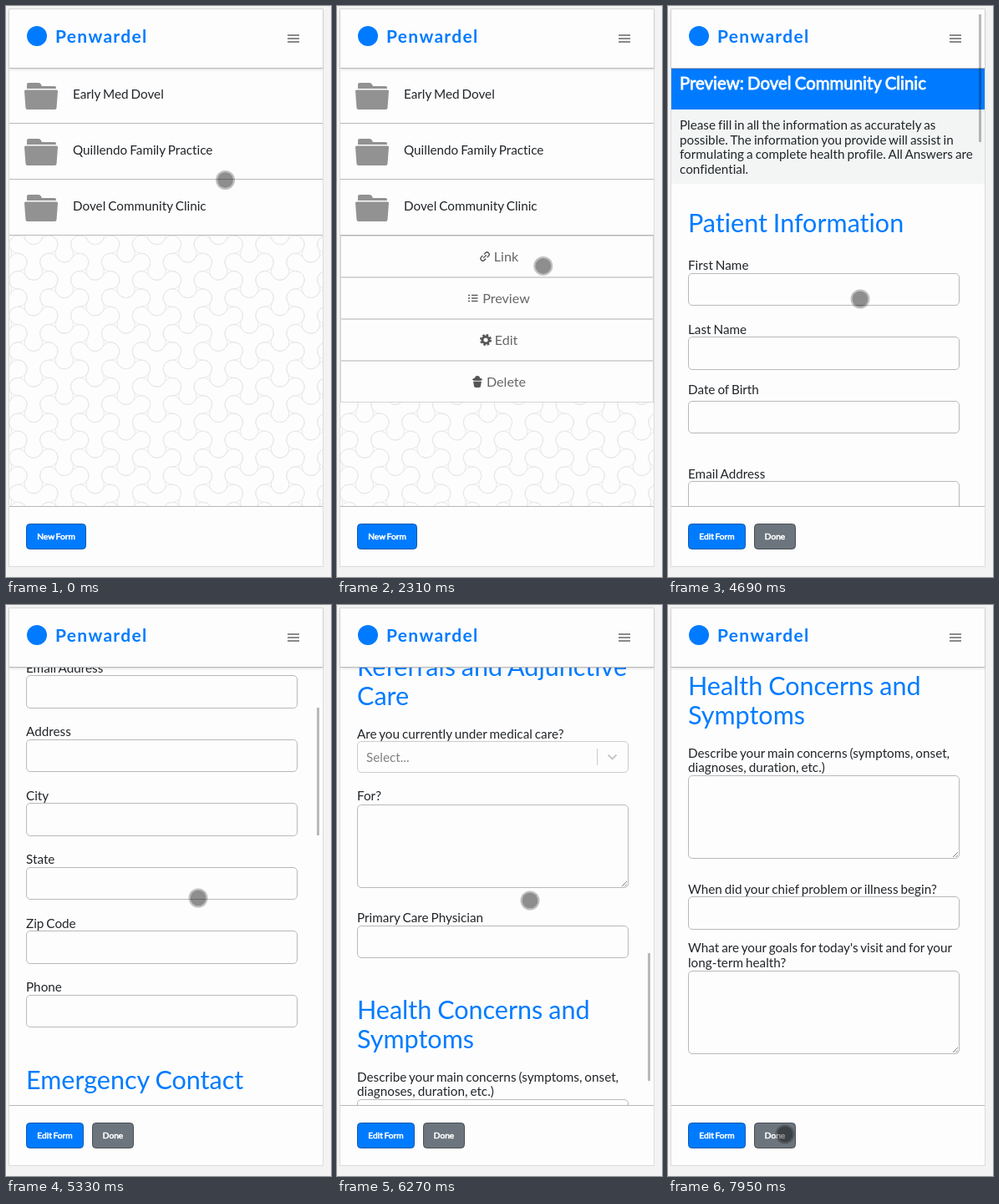
These frames come from a looping animation (389 px wide and 684 px high, 8 s). An HTML page:

```html
<!DOCTYPE html>
<html lang="en">
<head>
<meta charset="utf-8">
<title>Form preview</title>
<style>
html, body { margin: 0; width: 100%; height: 100%; overflow: hidden; background: #f3f3f3; }
body { position: relative; font: 15.27px/17.55px Lato, sans-serif; color: #212529;
  word-spacing: -.06em; font-variant-ligatures: none; }
body *, svg { position: absolute; box-sizing: border-box; white-space: nowrap; }
br { position: static !important; }
#card { left: 3px; top: 3px; width: 377px; height: 669px; background: #fdfdfd; border: 1px solid #dcdcdc; }
#view { left: 4px; top: 75px; width: 375px; height: 524px; overflow: hidden; }
#view > div { left: -4px; top: -75px; width: 389px; height: 2760px; }
#head { left: 4px; top: 4px; width: 375px; height: 71px; background: #fdfdfd; border-bottom: 1px solid #b8b8b8; box-shadow: 0 1px 3px #0002; }
#mark { left: 21px; top: 20px; width: 24px; height: 24px; border-radius: 50%; background: #007bff; }
#brand { left: 55px; top: 19px; font-weight: 700; font-size: 21px; line-height: 26px; letter-spacing: 1.3px; color: #007bff; }
#bars { left: 333px; top: 30px; }
#foot { left: 4px; top: 599px; width: 375px; height: 72px; background: #fdfdfd; border-top: 1px solid #b8b8b8; }
.btn { top: 20px; height: 31px; border: 1px solid #0a58ad; border-radius: 4.5px; background: #007bff; color: #fff;
  font-size: 10.18px; line-height: 29px; text-align: center; -webkit-text-stroke: .6px #fff; }
.gray { background: #6c757d; border-color: #484e54; }
.row { left: 4px; width: 375px; height: 67px; background: #fdfdfd; border-bottom: 1px solid #b8b8b8; }
.row span { left: 76px; top: 23px; }
.row svg { left: 18px; top: 18px; }
#menu { left: 4px; top: 275px; width: 375px; overflow: hidden; }
.item { left: 0; width: 375px; height: 50px; border: 1px solid #d6d6d6; background: #fdfdfd; color: #666;
  font-size: 16.1px; display: flex; align-items: center; justify-content: center; gap: 4px; padding-left: 4px; }
.item > * { position: static; }
#banner { left: 4px; top: 75px; width: 375px; height: 64px; background: #007bff; color: #fff; font-size: 20.4px;
  line-height: 64px; padding-left: 10px; -webkit-text-stroke: .8px #fff; }
#note { left: 4px; top: 139px; width: 375px; height: 89px; background: #f3f5f5; padding: 10px; }
h2 { left: 24px; margin: 0; font-weight: 400; font-size: 30.53px; line-height: 35.1px; color: #007bff; }
.label { left: 24px; }
.box { left: 24px; width: 325px; border: 1px solid #b9b9b9; border-radius: 5px; background: #fdfdfd; }
.pick { border-color: #ccc; color: #808080; line-height: 36px; padding-left: 10px; }
#thumb { left: 372px; width: 3px; height: 153px; background: rgba(0, 0, 0, .27); }
#dot { left: -11.5px; top: -11.5px; width: 23px; height: 23px; border-radius: 50%; border: 2px solid rgba(0, 0, 0, .24);
  background: rgba(0, 0, 0, .44); background-clip: padding-box; }
</style>
</head>
<body>
<div id="card"></div>
<div id="view">
  <div id="list"></div>
  <div id="form">
    <div id="banner">Preview: Dovel Community Clinic</div>
    <div id="note">Please fill in all the information as accurately as<br>possible. The information you provide will assist in<br>formulating a complete health profile. All Answers are<br>confidential.</div>
  </div>
</div>
<div id="head">
  <div id="mark"></div><div id="brand">Penwardel</div>
  <svg id="bars" width="14" height="10"><path d="M0 1h14M0 5h14M0 9h14" stroke="#666" stroke-width="1.500"/></svg>
</div>
<div id="foot">
  <div id="listBtns"><div class="btn" style="left:20px;width:72px">New Form</div></div>
  <div id="formBtns">
    <div class="btn" style="left:20px;width:69px">Edit Form</div>
    <div class="btn gray" style="left:99px;width:50px">Done</div>
  </div>
</div>
<div id="thumb"></div>
<div id="dot"></div>
<script>
const $ = id => document.getElementById(id);
const add = (parent, html) => parent.insertAdjacentHTML('beforeend', html);
const list = $('list'), form = $('form');

// Interlocking three-lobed outlines
function lobes(cx, cy, r) {
  const pt = deg => {
    const a = deg * Math.PI / 180, d = r * Math.sqrt(3);
    return (cx + d * Math.cos(a)).toFixed(2) + ' ' + (cy + d * Math.sin(a)).toFixed(2);
  };
  let d = 'M' + pt(60);
  for (let a = 90; a < 450; a += 120)
    d += `A${r} ${r} 0 1 1 ${pt(a + 30)}A${r} ${r} 0 0 0 ${pt(a + 90)}`;
  return d;
}
function pattern() {
  const r = 10.65, dx = 2 * r * Math.sqrt(3), dy = 4 * r;
  let d = '';
  for (let i = 0; i < 12; i++)
    for (let j = 0; j < 10; j++) d += lobes(i * dx - 8, j * dy - (i % 2) * dy / 2, r);
  return `<svg style="left:4px;top:275px" width="375" height="325"><path d="${d}" fill="none" stroke="#e8e8e8"/></svg>`;
}

const folder = `<svg width="40" height="33" fill="#929292"><path d="M3 7V2q0-2 2-2h12q2 0 3 2l1 2h15q2 0 2 2v1z"/>
  <path d="M1.500 8.500H38.500Q40 8.500 40 10L38.500 30Q38.300 32 36.500 32H3.500Q1.700 32 1.500 30L0 10Q0 8.500 1.500 8.500z"/></svg>`;
const icons = {
  Link: `<g fill="none" stroke="#5f5f5f" stroke-width="1.500" transform="rotate(-45 7 7)">
    <path d="M6 4.500H3.500a2.600 2.600 0 0 0 0 5.200H6M8 4.500h2.500a2.600 2.600 0 0 1 0 5.200H8M4.500 7.100h5"/></g>`,
  Preview: '<path d="M1 3.500h2M1 7h2M1 10.500h2M5 3.500h7.500M5 7h7.500M5 10.500h7.500" stroke="#5f5f5f" stroke-width="1.700"/>',
  Edit: `<g fill="none" stroke="#555"><circle cx="7" cy="7" r="4" stroke-width="2.800"/>
    <circle cx="7" cy="7" r="6" stroke-width="2" stroke-dasharray="2.600 2.112"/></g>`,
  Delete: `<g fill="#555"><path d="M2 6.500h10l-1.300 7q-3.700 1-7.400 0z"/><ellipse cx="7" cy="4.300" rx="6" ry="2"/>
    <path d="M4 3q0-3 3-3t3 3z"/></g><path d="M1.500 6.300h11" stroke="#fdfdfd" stroke-width=".7"/>`
};

add(list, pattern());
['Early Med Dovel', 'Quillendo Family Practice', 'Dovel Community Clinic'].forEach((name, i) =>
  add(list, `<div class="row" style="top:${74 + 67 * i}px">${folder}<span>${name}</span></div>`));
add(list, '<div id="menu">' + Object.keys(icons).map((name, i) =>
  `<div class="item" style="top:${50 * i}px"><svg width="14" height="14">${icons[name]}</svg><span>${name}</span></div>`).join('') + '</div>');

// The form flows down from y, the middle of the next label's first line
const LINE = 17.55;
const grip = '<svg style="right:1px;bottom:1px" width="6" height="6"><path d="M0 6L6 0M3.500 6L6 3.500" stroke="#666" stroke-width=".8"/></svg>';
const chevron = `<svg style="left:286px;top:8px" width="34" height="21"><path d="M.5 0V20" stroke="#ccc"/>
  <path d="M13.500 7.500l5 5 5-5" fill="none" stroke="#c4c4c4" stroke-width="1.800"/></svg>`;
let y = 240.6;

function title(...lines) {
  y += 34.4;
  add(form, `<h2 style="top:${y - 18.5}px">${lines.join('<br>')}</h2>`);
  y += 22.6 + 28.4 * lines.length;
}
function block(lines, { gap = 8.7, height = 39.5, step = 76.5, inner = '', kind = '' } = {}) {
  const extra = (lines.length - 1) * LINE;
  add(form, `<div class="label" style="top:${y - LINE / 2}px">${lines.join('<br>')}</div>
    <div class="box ${kind}" style="top:${y + extra + gap}px;height:${height}px">${inner}</div>`);
  y += extra + step;
}
const fields = (names, step) => names.forEach(n => block([n], { step }));
const area = (...lines) => block(lines, { gap: 9.5, height: 100, step: 145.8, inner: grip });

title('Patient Information');
fields(['First Name']);
fields(['Last Name'], 72);
block(['Date of Birth'], { gap: 13.2, step: 101.2 });
fields(['Email Address', 'Address', 'City', 'State', 'Zip Code', 'Phone']);
title('Emergency Contact');
fields(['Name', 'Relationship', 'Phone']);
title('Insurance Information');
fields(['Insurance Provider', 'Policy Number', 'Group Number', 'Policy Holder', 'Relationship'], 74.5);
title('Referrals and Adjunctive', 'Care');
block(['Are you currently under medical care?'], { height: 38, step: 74.9, inner: 'Select...' + chevron, kind: 'pick' });
area('For?');
fields(['Primary Care Physician']);
title('Health Concerns and', 'Symptoms');
area('Describe your main concerns (symptoms, onset,', 'diagnoses, duration, etc.)');
fields(['When did your chief problem or illness begin?'], 70.5);
area("What are your goals for today's visit and for your", 'long-term health?');

const LOOP = 8000, STEP = 120, OPEN_FORM = 3040;
const linear = p => p;
const smooth = p => p * p * (3 - 2 * p);
const easeIn = p => p ** 3;
const easeOut = p => 1 - (1 - p) ** 4;

// A track is a first value and moves: start time, number of held steps, end value, easing
function valueAt({ from, moves }, t) {
  let v = from;
  for (const [start, steps, to, ease = linear] of moves) {
    if (t < start) break;
    const p = ease(Math.min(1, (Math.floor((t - start) / STEP) + 1) / steps));
    v = v.map((a, i) => a + (to[i] - a) * p);
  }
  return v;
}
const pointer = { from: [262, 208], moves: [
  [120, 1, [262.5, 238]],
  [2070, 5, [237.5, 350.5], smooth],
  [3900, 4, [229.5, 350.5], smooth],
  [6270, 1, [230.5, 353.5]],
  [6780, 1, [230.5, 357.5]],
  [7440, 5, [139.5, 633.5]]
] };
const scroll = { from: [0], moves: [
  [4690, 3, [400], easeIn],
  [5330, 2, [507], easeOut],
  [5600, 4, [1692]],
  [6270, 4, [1991]],
  [6780, 5, [2155], easeOut]
] };
const menu = { from: [0], moves: [[710, 3, [200]]] };
const thumb = { from: [0], moves: [[4690, 1, [1]], [7440, 4, [0]]] };

const show = (id, on) => { $(id).style.display = on ? 'block' : 'none'; };

function draw(t) {
  const isForm = t >= OPEN_FORM;
  const [px, py] = valueAt(pointer, t), s = Math.round(valueAt(scroll, t)[0]);
  show('list', !isForm);
  show('listBtns', !isForm);
  show('form', isForm);
  show('formBtns', isForm);
  $('menu').style.height = valueAt(menu, t)[0] + 'px';
  form.style.transform = `translateY(${-s}px)`;
  $('thumb').style.top = Math.round(7 + s * .232) + 'px';
  $('thumb').style.opacity = valueAt(thumb, t)[0];
  $('dot').style.transform = `translate(${px}px, ${py}px)`;
}
const begin = performance.now();
function tick() {
  draw((performance.now() - begin) % LOOP);
  requestAnimationFrame(tick);
}
tick();
</script>
</body>
</html>
```
